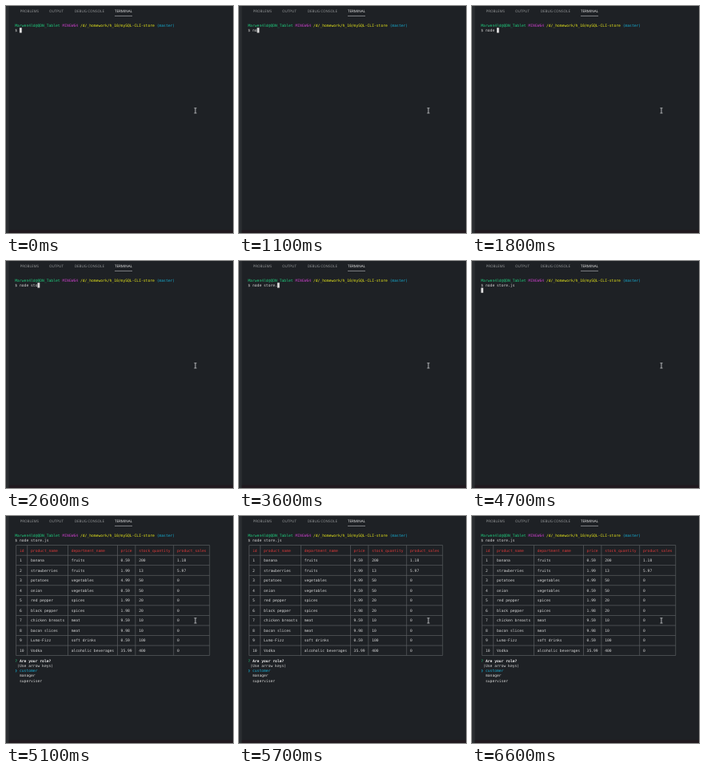
An HTML page with a canvas for the animation above (8 s loop, 284 by 284 pixels).

```html
<!DOCTYPE html>
<html lang="en">
<head>
<meta charset="utf-8">
<title>Terminal</title>
<style>
  html, body { margin: 0; width: 100%; height: 100%; overflow: hidden; background: #1e2125; }
  canvas { display: block; width: 100vw; height: 100vh; }
</style>
</head>
<body>
<canvas id="stage"></canvas>
<script>
const SIZE = 284, LOOP = 8000;
const X0 = 11.3, CW = 2.815, Y0 = 24.1, LH = 6.27;
const MONO = '"DejaVu Sans Mono", monospace';
const SANS = '"Open Sans", sans-serif';
const C = {
  bg: '#1e2125', edge: '#2b2e31', foot: '#21191f', line: '#5a5d60',
  text: '#d6d6d6', tab: '#989a9c', white: '#f0f0f0', green: '#1fd07f',
  magenta: '#c63fc6', yellow: '#f0f01a', cyan: '#16b0d6', red: '#dc3a3a'
};

const COMMAND = 'node store.js';
const KEYS = [1000, 1100, 1300, 1500, 1700, 2200, 2400, 2600, 2700, 2800, 3600, 3900, 4000];
const ENTER = 4300, OUTPUT = 5100;

const WIDTHS = [4, 17, 21, 7, 16, 15];
const HEAD = ['id', 'product_name', 'department_name', 'price', 'stock_quantity', 'product_sales'];
const ROWS = [
  ['banana', 'fruits', '0.59', '200', '1.18'],
  ['strawberries', 'fruits', '1.99', '13', '5.97'],
  ['potatoes', 'vegetables', '4.99', '50', '0'],
  ['onion', 'vegetables', '0.59', '50', '0'],
  ['red pepper', 'spices', '1.99', '20', '0'],
  ['black pepper', 'spices', '1.98', '20', '0'],
  ['chicken breasts', 'meat', '9.59', '10', '0'],
  ['bacon slices', 'meat', '9.98', '10', '0'],
  ['Lumo-Fizz', 'soft drinks', '0.59', '100', '0'],
  ['Vodka', 'alcoholic beverages', '35.99', '400', '0']
];

const canvas = document.getElementById('stage');
const ctx = canvas.getContext('2d');

const colX = col => X0 + col * CW;
const rowY = row => Y0 + row * LH;

function rect(x, y, w, h, color) {
  ctx.fillStyle = color;
  ctx.fillRect(x, y, w, h);
}

// Writes text on the character grid.
function put(col, row, text, color = C.text, weight = '') {
  ctx.font = `${weight} 4.68px ${MONO}`;
  ctx.fillStyle = color;
  [...text].forEach((ch, i) => {
    if (ch !== ' ') ctx.fillText(ch, colX(col + i), rowY(row) + 1.7);
  });
}

function drawCursor(col, row) {
  rect(colX(col), rowY(row) - LH / 2, CW, LH, '#dcdcdc');
}

function drawFrame() {
  rect(0, 0, SIZE, SIZE, C.bg);
  rect(0, 0, 3.6, SIZE, C.edge);
  rect(3.6, 280.5, SIZE, 3.5, C.foot);
  ctx.font = `4.55px ${SANS}`;
  const tabs = [['PROBLEMS', 17.5], ['OUTPUT', 54], ['DEBUG CONSOLE', 85.7], ['TERMINAL', 136]];
  tabs.forEach(([name, x], i) => {
    ctx.fillStyle = i === 3 ? C.white : C.tab;
    ctx.fillText(name, x, 7.7);
  });
  rect(136, 12, 22, 0.6, '#b8babc');
}

function drawPrompt() {
  let col = 0;
  const parts = [
    ['Marwen4ld@QDN_Tablet', C.green], ['MINGW64', C.magenta],
    ['/d/_homework/h_10/mySQL-CLI-store', C.yellow], ['(master)', C.cyan]
  ];
  for (const [text, color] of parts) {
    put(col, 0, text, color);
    col += text.length + 1;
  }
  put(0, 1, '$');
}

function drawTable() {
  const edges = [0];
  WIDTHS.forEach((w, i) => edges.push(edges[i] + w + 1));
  const last = 2 + 2 * (ROWS.length + 1);
  const left = colX(0.5), right = colX(edges[6] + 0.5);
  for (let row = 2; row <= last; row += 2) rect(left, rowY(row) - 0.35, right - left, 0.7, C.line);
  for (const e of edges) rect(colX(e + 0.5) - 0.35, rowY(2), 0.7, rowY(last) - rowY(2), C.line);

  HEAD.forEach((name, i) => put(edges[i] + 2, 3, name, C.red));
  ROWS.forEach((cells, r) => {
    [String(r + 1), ...cells].forEach((cell, i) => put(edges[i] + 2, 5 + 2 * r, cell));
  });
}

function drawMenu() {
  put(0, 25, '?', C.green);
  put(2, 25, 'Are your role?', C.white, 'bold');
  put(1, 26, '(Use arrow keys)');
  put(0, 27, '❯ customer', C.cyan);
  put(2, 28, 'manager');
  put(2, 29, 'superviser');
}

function drawPointer() {
  const color = '#c4c6c8';
  rect(236.5, 127.8, 0.9, 6.2, color);
  rect(235.4, 127.4, 3.1, 0.8, color);
  rect(235.4, 133.6, 3.1, 0.8, color);
}

function draw(t) {
  drawFrame();
  drawPrompt();
  const typed = KEYS.filter(k => t >= k).length;
  put(2, 1, COMMAND.slice(0, typed));
  if (t < ENTER) drawCursor(2 + typed, 1);
  else if (t < OUTPUT) drawCursor(0, 2);
  else {
    drawTable();
    drawMenu();
  }
  drawPointer();
}

function fit() {
  const dpr = window.devicePixelRatio || 1;
  const w = Math.round(innerWidth * dpr), h = Math.round(innerHeight * dpr);
  if (canvas.width !== w || canvas.height !== h) {
    canvas.width = w;
    canvas.height = h;
  }
  ctx.setTransform(w / SIZE, 0, 0, h / SIZE, 0, 0);
  ctx.textRendering = 'geometricPrecision';
}

const start = performance.now();
function tick() {
  fit();
  draw((performance.now() - start) % LOOP);
  requestAnimationFrame(tick);
}
tick();
</script>
</body>
</html>
```
